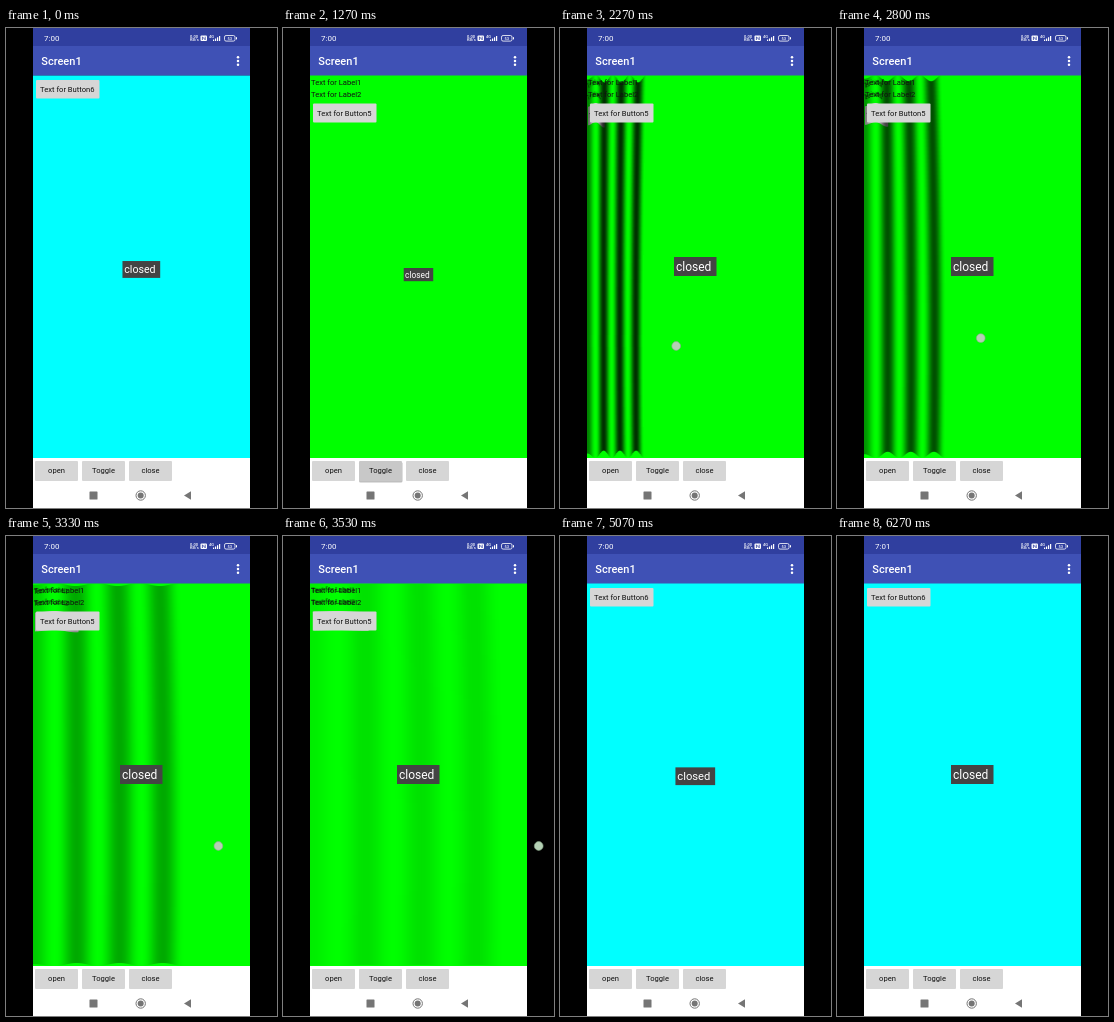
Write an HTML page with a canvas that moves like this. It is 271 px wide and 480 px high and loops after 6.47 s.

```html
<!DOCTYPE html>
<html lang="en">
<head>
<meta charset="utf-8">
<title>Curtain layout</title>
<style>
  html, body { margin: 0; width: 100%; height: 100%; overflow: hidden; background: #000; }
  canvas, svg { position: absolute; left: 0; top: 0; width: 271px; height: 480px; }
  text { font-family: Roboto, "Open Sans", sans-serif; font-size: 7.6px; fill: #111; }
  .mid { text-anchor: middle; }
  .white, .white text { fill: #fff; }
  .tiny { font-size: 4px; font-weight: 500; }
  .btn { fill: #d6d6d6; }
</style>
</head>
<body>
<canvas id="pane" width="271" height="480"></canvas>
<svg viewBox="0 0 271 480">
  <rect x="27" width="217" height="18" fill="#303f9f"/>
  <rect x="27" y="18" width="217" height="29.5" fill="#3f51b5"/>
  <rect x="27" y="430" width="217" height="50" fill="#fff"/>

  <g class="white">
    <text id="clock" x="38" y="13" style="font-size:8px">7:00</text>
    <text class="tiny" x="184" y="9.8">0.00</text>
    <text class="tiny" x="184" y="13.4">KB/s</text>
    <rect x="194.5" y="7.5" width="6.5" height="5.5" rx="1"/>
    <path d="M196.4 12V8.8L199.2 11.8V8.6" fill="none" stroke="#303f9f" stroke-width=".8"/>
    <text class="tiny" x="203" y="10">4G</text>
    <path d="M207 13v-1.5h1.2V13zM209 13v-2.6h1.2V13zM211 13V9.2h1.2V13zM213 13V8h1.2v5z"/>
    <rect x="218.5" y="7.5" width="10.5" height="5.6" rx="1.6" fill="none" stroke="#fff" stroke-width=".8"/>
    <text class="tiny mid" x="223.7" y="11.8">53</text>
    <rect x="230" y="9.2" width="1" height="2.2"/>
    <text x="35.3" y="37.2" style="font-size:11px;font-weight:500">Screen1</text>
    <circle cx="232" cy="29.3" r="1.25"/>
    <circle cx="232" cy="33" r="1.25"/>
    <circle cx="232" cy="36.7" r="1.25"/>
  </g>

  <g id="cyanPage">
    <rect class="btn" x="30" y="52" width="63.5" height="18.5" rx="1"/>
    <text class="mid" x="61.3" y="63.6">Text for Button6</text>
  </g>
  <g id="greenPage">
    <text x="28" y="56.8">Text for Label1</text>
    <text x="28" y="68.8">Text for Label2</text>
    <rect class="btn" x="30" y="75.5" width="63.5" height="19" rx="1"/>
    <text class="mid" x="61.3" y="87.6">Text for Button5</text>
  </g>

  <rect id="shadow" x="76" y="434" width="43.5" height="20.5" rx="1.5" fill="#000"/>
  <rect class="btn" x="29" y="433" width="43" height="20" rx="1"/>
  <rect class="btn" x="76" y="433" width="43" height="20" rx="1" id="toggle"/>
  <rect class="btn" x="123" y="433" width="43" height="20" rx="1"/>
  <text class="mid" x="50.5" y="445">open</text>
  <text class="mid" x="97.5" y="445">Toggle</text>
  <text class="mid" x="144.5" y="445">close</text>

  <g fill="#757575">
    <rect x="83.5" y="463.5" width="8" height="8" rx=".6"/>
    <circle cx="134.7" cy="467.5" r="4.7" fill="none" stroke="#757575"/>
    <circle cx="134.7" cy="467.5" r="3"/>
    <path d="M178 467.5L185 463.2V471.8z"/>
  </g>

  <g id="status">
    <rect x="114" y="229" width="42.5" height="19" fill="#444"/>
    <text class="white" x="116" y="243" style="font-size:12px">closed</text>
  </g>
  <circle id="finger" r="4.4" fill="#b4d0b4" stroke="#8aa88a" stroke-width=".6"/>
</svg>
<script>
const LOOP = 6470, STEP = 200 / 3;
const LEFT = 27, TOP = 47.5, W = 217, H = 383;
const FOLDS = 3.5;
const GREEN = '#00ff00', CYAN = '#00ffff';
// curtain width over time: [ms, px]
const PATH = [[800, 217], [1240, 0], [1400, 0], [1700, 150], [1870, 105],
              [2270, 56], [2350, 53], [3330, 151], [3700, 217], [3800, 217]];
const PULSES = [-390, 1240, 4590];

const $ = id => document.getElementById(id);
const clamp = (v, lo, hi) => Math.min(hi, Math.max(lo, v));
const ctx = $('pane').getContext('2d');

function makeCanvas(w, h) {
  const c = document.createElement('canvas');
  c.width = w;
  c.height = h;
  return c;
}

function makePage() {
  const c = makeCanvas(W, H), g = c.getContext('2d');
  g.fillStyle = GREEN;
  g.fillRect(0, 0, W, H);
  g.translate(-LEFT, -TOP);
  g.fillStyle = '#d6d6d6';
  g.fillRect(30, 75.5, 63.5, 19);
  g.fillStyle = '#111';
  g.font = '7.6px Roboto, "Open Sans", sans-serif';
  g.fillText('Text for Label1', 28, 56.8);
  g.fillText('Text for Label2', 28, 68.8);
  g.fillText('Text for Button5', 33.5, 87.6);
  return c;
}

const page = makePage();
const folded = makeCanvas(W + 1, H);
const fctx = folded.getContext('2d');

const slope = i => (PATH[i + 1][1] - PATH[i][1]) / (PATH[i + 1][0] - PATH[i][0]);

function tangent(i) {
  if (i === 0 || i === PATH.length - 1) return 0;
  const a = slope(i - 1), b = slope(i);
  return a * b <= 0 ? 0 : 2 * a * b / (a + b);
}

// monotone cubic through PATH
function widthAt(t) {
  const last = PATH.length - 1;
  if (t <= PATH[0][0]) return PATH[0][1];
  if (t >= PATH[last][0]) return PATH[last][1];
  const i = PATH.findIndex(p => p[0] > t) - 1;
  const [t0, a] = PATH[i], [t1, b] = PATH[i + 1];
  const h = t1 - t0, s = (t - t0) / h, r = 1 - s;
  return a * (1 + 2 * s) * r * r + b * s * s * (3 - 2 * s)
    + h * s * r * (tangent(i) * r - tangent(i + 1) * s);
}

function drawCurtain(w, lean) {
  if (w < 1) return;
  const depth = 1 - w / W;
  fctx.clearRect(0, 0, W + 1, H);
  for (let x = 0; x < w; x++) {
    const turn = FOLDS * x / w;
    const dark = (1 + Math.cos(2 * Math.PI * turn)) / 2 * (turn < 0.5 ? 0.6 : 1);
    const inset = 10 * depth * dark, tall = H - 2 * inset;
    const sx = x / w * W;
    fctx.drawImage(page, sx, 0, Math.min(W / w, W - sx), H, x, inset, 1, tall);
    fctx.fillStyle = `rgba(0,0,0,${clamp(1.1 * depth * dark, 0, 0.85)})`;
    fctx.fillRect(x, inset, 1, tall);
  }
  for (let y = 0; y < H; y += 4) {
    const far = (y + TOP - 310) / 260;
    const h = Math.min(4, H - y);
    ctx.drawImage(folded, 0, y, w, h, LEFT, Math.floor(TOP) + y, Math.max(1, w + lean * far * far), h);
  }
}

function render(t) {
  const cyan = t < 790 || t > 3790;
  const w = widthAt(t);
  const speed = (widthAt(t + 2) - widthAt(t - 2)) / 4;
  const touching = t > 1390 && t < 3560;

  ctx.fillStyle = cyan ? CYAN : GREEN;
  ctx.fillRect(LEFT, TOP, W, H);
  if (!cyan) drawCurtain(w, touching ? clamp(-48 * speed, -4, 14) : 0);
  $('cyanPage').style.display = cyan ? '' : 'none';
  $('greenPage').style.display = cyan ? 'none' : '';

  const finger = $('finger');
  finger.style.display = touching ? '' : 'none';
  finger.setAttribute('cx', 62 + 0.98 * w + 15 * speed);
  finger.setAttribute('cy', 310 + 8 * Math.exp(-(((t - 2270) / 250) ** 2)));

  const start = PULSES.filter(p => p <= t).pop();
  const scale = 0.68 + 0.32 * clamp((t - start) / 600, 0, 1);
  $('status').setAttribute('transform', `translate(136 265) scale(${scale}) translate(-136 -265)`);

  const press = t < 660 ? 0 : clamp((1800 - t) / 500, 0, 1);
  const grey = Math.round(214 - 14 * press);
  $('toggle').style.fill = `rgb(${grey},${grey},${grey})`;
  $('shadow').style.opacity = 0.25 * press;

  $('clock').textContent = t > 6190 ? '7:01' : '7:00';
}

const begin = performance.now();
function tick() {
  const t = (performance.now() - begin) % LOOP;
  render(Math.floor((t + 4) / STEP) * STEP);
  requestAnimationFrame(tick);
}
tick();
</script>
</body>
</html>
```
